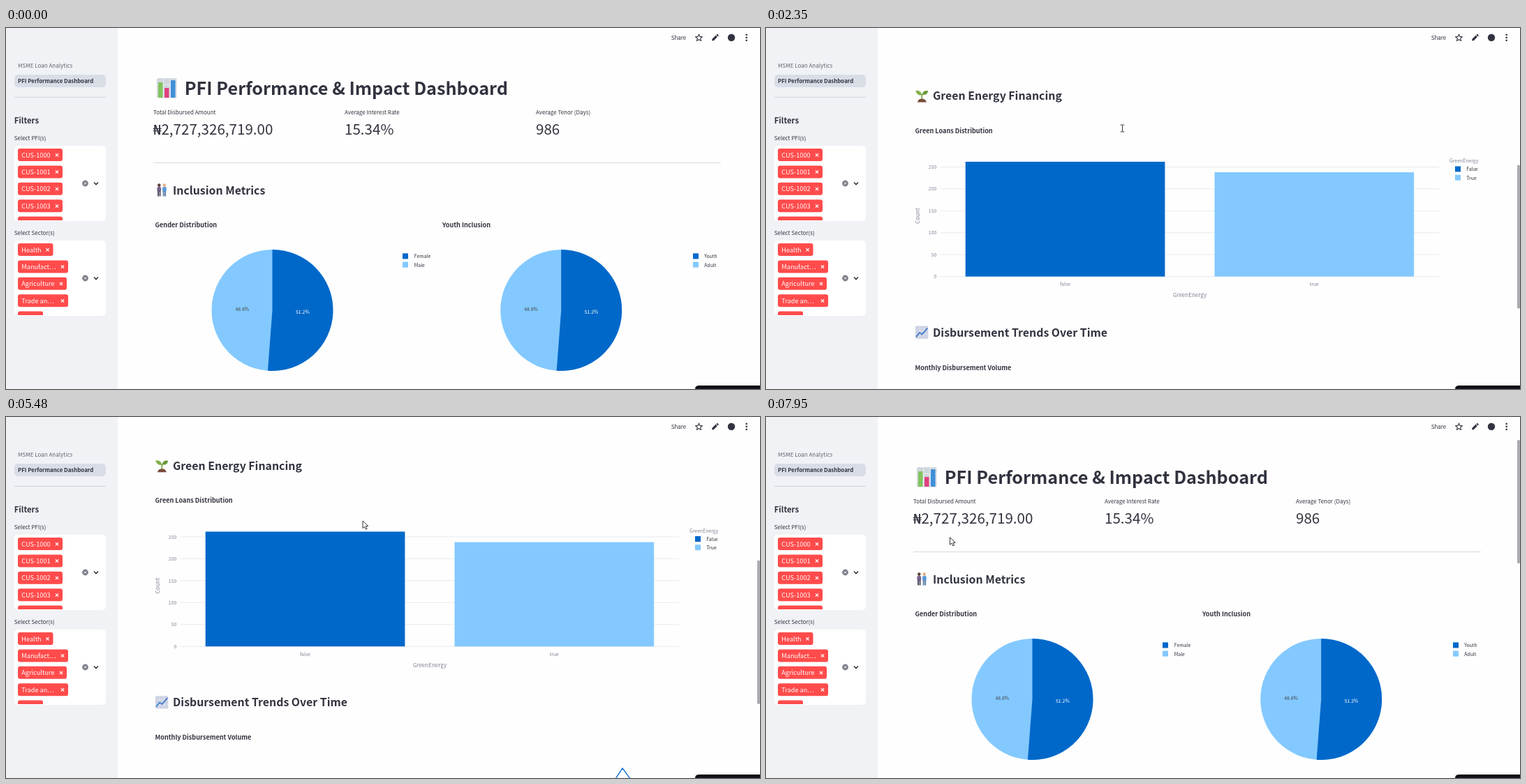
An HTML page that plays this animation: 1080x518 px, repeating every 8000 ms.

```html
<!DOCTYPE html>
<html lang="en">
<head>
<meta charset="utf-8">
<title>Dashboard scroll</title>
<style>
  html, body { margin: 0; width: 100%; height: 100%; overflow: hidden; background: #fefefe; }
  svg { display: block; width: 100%; height: 100%; }
  text { font-family: 'Noto Sans CJK SC', 'Noto Sans CJK JP', 'Noto Sans', sans-serif; white-space: pre; }
</style>
</head>
<body>
<svg id="stage" viewBox="0 0 1080 518" xmlns="http://www.w3.org/2000/svg"></svg>
<script>
const INK = '#31333f', DIM = '#808495', BLUE = '#0068c9', SKY = '#83c9ff', RED = '#ff4b4b', PAPER = '#fefefe';

// ---- drawing helpers (all return SVG markup) ----
const text = (x, y, s, size, o = {}) =>
  `<text x="${x}" y="${y}" font-size="${size}" fill="${o.fill || INK}" font-weight="${o.weight || 400}"` +
  ` text-anchor="${o.anchor || 'start'}"${o.turn ? ` transform="rotate(-90 ${x} ${y})"` : ''}>${s}</text>`;
const rect = (x, y, w, h, fill, r = 0) =>
  `<rect x="${x}" y="${y}" width="${w}" height="${h}" rx="${r}" fill="${fill}"/>`;
const line = (d, stroke, w = 1, extra = '') =>
  `<path d="${d}" fill="none" stroke="${stroke}" stroke-width="${w}" ${extra}/>`;
const shape = (d, fill) => `<path d="${d}" fill="${fill}"/>`;
const dot = (x, y, r, fill) => `<circle cx="${x}" cy="${y}" r="${r}" fill="${fill}"/>`;
const cross = (x, y, r, stroke, w) =>
  line(`M${x - r} ${y - r}l${2 * r} ${2 * r}m0 ${-2 * r}l${-2 * r} ${2 * r}`, stroke, w);
const at = (x, y, inner) => `<g transform="translate(${x} ${y})">${inner}</g>`;
const heading = (y, s) => text(239, y, s, 15.85, { weight: 600 });
const chartTitle = (x, y, s) => text(x, y, s, 9.1, { weight: 700 });
const tick = (x, y, s, anchor) => text(x, y, s, 6.88, { fill: DIM, anchor });
const axisName = (x, y, s, turn) => text(x, y, s, 8.02, { fill: DIM, anchor: 'middle', turn });

function legend(x, y, names, gap) {
  return names.map((n, i) =>
    rect(x, y + i * 12.2, 8, 8, i ? SKY : BLUE) + text(x + gap, y + 7 + i * 12.2, n, 6.88)).join('');
}

// ---- sidebar ----
function picker(y, label, tags) {
  const id = 'box' + y;
  const chips = tags.map(([name, w], i) => {
    const ty = y + 4 + i * 24.4;
    return rect(17, ty, w, 18, RED, 3) + text(22.3, ty + 12.5, name, 9.17, { fill: '#fff' }) +
      cross(w + 9, ty + 9.2, 2.1, '#fff', 1.2);
  }).join('');
  return text(11.7, y - 8, label, 8.02) + rect(12, y, 131, 108, '#fff', 5) +
    `<clipPath id="${id}"><rect x="12" y="${y}" width="131" height="107"/></clipPath>` +
    `<g clip-path="url(#${id})">${chips}</g>` +
    dot(113.5, y + 54, 4.4, '#7d7f89') + cross(113.5, y + 54, 1.5, '#fff', 1) +
    line(`M126 ${y + 52.5}l3 3l3 -3`, INK, 1.6);
}

const sidebar = rect(0, 0, 160, 518, '#f0f2f6') +
  text(17, 57, 'MSME Loan Analytics', 8.02, { fill: '#62646f' }) +
  rect(12, 67, 131, 18, '#d9dde6', 5) +
  text(17, 79, 'PFI Performance Dashboard', 7.88, { weight: 600 }) +
  rect(12, 98.8, 131, 1, '#d0d2d9') +
  text(11.7, 137, 'Filters', 11.4, { weight: 600 }) +
  picker(169, 'Select PFI(s)', [0, 1, 2, 3, 4].map(i => ['CUS-100' + i, 64])) +
  picker(305, 'Select Sector(s)', [['Health', 50.5], ['Manufact…', 72], ['Agriculture', 70], ['Trade an…', 72], ['ICT', 36]]);

// ---- header ----
const star = 'M' + Array.from({ length: 10 }, (_, i) => {
  const a = i * Math.PI / 5, r = i % 2 ? 2.3 : 5.2;
  return `${992.5 + r * Math.sin(a)} ${14.2 - r * Math.cos(a)}`;
}).join('L') + 'Z';

const header = rect(160, 0, 920, 33, PAPER) + text(952.7, 17, 'Share', 8.02) +
  line(star, INK, 1.1, 'stroke-linejoin="round"') +
  shape('M1011.3 18.2v-2.3l5.3-5.3l2.3 2.3l-5.3 5.3zM1017.3 9.9l1-1q.5-.4 1 0l1.3 1.3q.4.5 0 1l-1 1z', INK) +
  dot(1039, 13.8, 5.2, INK) + [9.8, 13.8, 17.8].map(y => dot(1060.7, y, 1.3, INK)).join('');

// ---- small pictures beside the headings ----
const barsIcon = at(216, 72, rect(0, 0, 28.5, 28.5, '#d0d7de', 2) +
  line('M0 9.5h28.5M0 19h28.5M9.5 0v28.5M19 0v28.5', '#e6ebef', 1) +
  rect(2, 6, 6.5, 22, '#83c45c', 1) + rect(11, 14, 6.5, 14, '#e0417f', 1) + rect(20, 3, 6.5, 25, '#3f8fd9', 1));
const person = (x, top, skin, legs) => dot(x, 2.6, 2.3, skin) + rect(x - 2.9, 5, 5.8, 7, top, 2) +
  rect(x - 2.2, 11, 1.9, 7.5, legs) + rect(x + .3, 11, 1.9, 7.5, legs);
const pairIcon = at(214.5, 223, person(4.8, '#77618c', '#5b4038', '#4d4a63') + person(12.4, '#5a9bd8', '#e2b184', '#5d7fa8'));
const sproutIcon = at(214, 562.5,
  shape('M3 18.5q1-5 6.3-5t6.5 5z', '#7a4b3a') + line('M9.4 14.5q-.4-4 .4-7.5', '#6a9a34', 1.5) +
  shape('M9.5 8.3Q2 9 .2 1.8Q8 .4 9.5 8.3z', '#83b04a') + shape('M9.7 7.5Q10.5.8 18.2 2Q17 9.3 9.7 7.5z', '#699c38'));
const trendIcon = at(214, 902, rect(0, 0, 18.3, 18.3, '#cdd2e4', 1.5) +
  line('M0 6h18.3M0 12h18.3M6 0v18.3M12 0v18.3', '#e3e6f1', .7) +
  line('M1 15.5L6 9.5L9.5 12L17.3 3', '#3b78c6', 1.7));

// ---- page content, placed as at scroll position 0 ----
function pie(cx, title, tx, names, lx, gap) {
  const r = 87, cy = 405, a = .512 * 2 * Math.PI;
  return chartTitle(tx, 286, title) + dot(cx, cy, r, SKY) +
    shape(`M${cx} ${cy}V${cy - r}A${r} ${r} 0 1 1 ${cx + r * Math.sin(a)} ${cy - r * Math.cos(a)}Z`, BLUE) +
    text(cx + 43.4, 409.7, '51.2%', 6.88, { fill: '#fff', anchor: 'middle' }) +
    text(cx - 43.2, 405.7, '48.8%', 6.88, { fill: '#444', anchor: 'middle' }) +
    legend(lx, 323.4, names, gap);
}

function bars() {
  let s = chartTitle(213.5, 625, 'Green Loans Distribution');
  for (let i = 0; i < 6; i++) {
    const y = 831 - i * 31.45;
    s += rect(250, y - .5, 714, 1, '#e8eaf0') + tick(244.3, y + 2.7, i * 50, 'end');
  }
  return s + rect(285.7, 666.3, 285.7, 164.7, BLUE) + rect(642.5, 681.4, 285.6, 149.6, SKY) +
    tick(428.5, 844.7, 'false', 'middle') + tick(785.3, 844.7, 'true', 'middle') +
    axisName(607, 860.6, 'GreenEnergy') + axisName(220, 744, 'Count', true) +
    text(979, 667.6, 'GreenEnergy', 6.88, { fill: DIM }) + legend(987, 672.8, ['False', 'True'], 16.3);
}

const MONTH_X = [255.5, 326.5, 391, 462.5, 531.3, 602.5, 671.5, 743, 814, 883, 954.3, 1023.5];
const MONTH_Y = [278.6, 332.3, 264.2, 275.4, 225, 238.8, 327.8, 275.7, 282.3, 176.6, 275.4, 273.4];

function trend() {
  let s = chartTitle(213.5, 965, 'Monthly Disbursement Volume');
  for (let i = 0; i < 5; i++) {
    const y = 1144.4 - i * 30.15;
    s += rect(255.5, y - .5, 768, 1, '#e8eaf0') + tick(249.3, y + 2.7, 150 + i * 50 + 'M', 'end');
  }
  ['Jan', 'Mar', 'May', 'Jul', 'Sep', 'Nov'].forEach((m, i) => s += tick(MONTH_X[2 * i], 1183.8, m + ' 2023', 'middle'));
  const pts = MONTH_X.map((x, i) => `${x} ${MONTH_Y[i] + 829}`).join('L');
  return s + line('M' + pts, BLUE, 1.3, 'stroke-linejoin="round"') +
    axisName(639, 1200, 'Month') + axisName(220, 1083.5, 'AmountGranted', true);
}

const GREY = '#c3c4c9';
const toolbar = '<g id="tools">' + at(0, 944,
  rect(886, -3.2, 10, 7.6, GREY, 1) + rect(889, -4.6, 4, 2, GREY) + dot(891, .6, 2.2, PAPER) + dot(891, .6, 1.1, GREY) +
  `<circle cx="910.5" cy="-.8" r="3.2" fill="none" stroke="#70727b" stroke-width="1.5"/>` +
  line('M912.8 1.6l3 3', '#70727b', 1.9) + line('M909 -.8h3m-1.5 -1.5v3', '#70727b', .9) +
  line('M922 0h10M927 -5v10', GREY, 1.2) +
  line('M923.8 -1.8l-1.8 1.8l1.8 1.8M930.2 -1.8l1.8 1.8l-1.8 1.8M925.2 -3.2l1.8 -1.8l1.8 1.8M925.2 3.2l1.8 1.8l1.8 -1.8', GREY, 1) +
  rect(943, -4.5, 9, 9, GREY, 1) + line('M944.6 0h5.8m-2.9 -2.9v5.8', PAPER, 1.3) +
  rect(958.5, -4.5, 9, 9, GREY, 1) + line('M960.1 0h5.8', PAPER, 1.3) +
  cross(978.5, 0, 3.4, GREY, 1.2) +
  line('M974 -2v-2.5h2.5M980.5 -4.5h2.5v2.5M983 2v2.5h-2.5M976.5 4.5h-2.5v-2.5', GREY, 1.2) +
  shape('M988.8 .3l5.2-4.8l5.2 4.8h-1.4v4h-2.5v-3h-2.6v3h-2.5v-4z', GREY) +
  line('M1009.5 -1.2v-2.3h2.4M1014.1 -3.5h2.4v2.3M1016.5 1.2v2.3h-2.4M1011.9 3.5h-2.4v-2.3', GREY, 1.2)) + '</g>';

const FAINT = { fill: '#83848c' };
const footer = rect(211, 1252.3, 813, 1, '#d8d9dd') +
  text(211, 1283.2, 'Built with', 8.02, FAINT) +
  shape('M254.9 1285l-4-4.2q-1.2-2.4.6-3.8q2-1 3.4.9q1.4-1.9 3.4-.9q1.8 1.4.6 3.8z', '#e59a8c') +
  text(262.8, 1283.2, 'for KVQ and regulators by Femolade Akundareze', 8.02, FAINT);

const metric = (x, label, value, vx = x) => text(x, 124, label, 8.02) + text(vx, 153, value, 20.6);
const page = barsIcon + text(255.8, 96, 'PFI Performance &amp; Impact Dashboard', 25.2, { weight: 700 }) +
  metric(211, 'Total Disbursed Amount', '2,727,326,719.00', 222.4) +
  `<text x="210.8" y="153" font-size="19.5" fill="${INK}" style="font-family:'DejaVu Sans Mono',monospace">₦</text>` +
  metric(485, 'Average Interest Rate', '15.34%') + metric(759, 'Average Tenor (Days)', '986') +
  rect(211, 193, 813, 1, '#d8d9dd') +
  pairIcon + heading(239, 'Inclusion Metrics') +
  pie(381.5, 'Gender Distribution', 213.5, ['Female', 'Male'], 568, 16.7) +
  pie(795.2, 'Youth Inclusion', 625, ['Youth', 'Adult'], 984, 16.2) +
  sproutIcon + heading(577.7, 'Green Energy Financing') + bars() +
  trendIcon + heading(917.2, 'Disbursement Trends Over Time') + trend() + toolbar + footer;

// ---- pointers, hot spot at 0,0 ----
const pointers = {
  arrow: `<path d="M0 0v10.6l2.5-2.3l1.7 3.9l1.9-.8l-1.7-3.8h3.4z" fill="#fff" stroke="#222" stroke-width=".9"/>`,
  beam: line('M-2.8 -5h2q.8 0 .8 .8v8.4q0 .8 -.8 .8h-2M2.8 -5h-2q-.8 0 -.8 .8v8.4q0 .8 .8 .8h2', '#333', 1),
  plus: line('M-7.5 0h15M0 -7.5v15', '#111', 1.6)
};

const stage = document.getElementById('stage');
stage.innerHTML = rect(0, 0, 1080, 518, PAPER) + `<g id="page">${page}</g>` + header + sidebar +
  '<rect id="thumb" x="1076" width="4" rx="1.5" fill="#acacb0"/>' +
  shape('M987 518q0-5 6-5h87v5z', '#0e1117') +
  Object.entries(pointers).map(([k, v]) => `<g id="${k}">${v}</g>`).join('');
const el = id => document.getElementById(id);

// ---- motion ----
// Wheel turns: start, duration, distance
const NOTCH = 179.15;
const TURNS = [
  [1375, 268, NOTCH], [1588, 481, NOTCH], [2242, 268, NOTCH], [2640, 310, NOTCH], [3100, 250, 112.5],
  [5040, 270, -NOTCH], [5300, 310, -NOTCH], [5871, 399, -2 * NOTCH], [6420, 310, -112.5]
];
// Scroll position, thumb top, thumb bottom
const THUMB = [[0, 33, 210], [231, 79, 285], [247, 99, 305], [473, 196, 402], [717, 278, 485], [829, 311, 518]];
// Time, x, y
const PATH = [
  [300, 800, 520], [430, 640, 320], [620, 510.5, 144], [2650, 510.5, 144], [2700, 508.7, 143.6],
  [3350, 508.7, 143.6], [3500, 510.5, 148], [5040, 510.5, 148], [5100, 511, 149], [7440, 511, 149],
  [7540, 762, 300], [7640, 640, 450], [7750, 340, 430], [7850, 206, 260], [7940, 263.5, 172.7]
];

const clamp = p => Math.min(1, Math.max(0, p));
function lerpKeys(keys, v) {
  const last = keys.length - 1;
  let i = 0;
  while (i < last - 1 && v > keys[i + 1][0]) i++;
  const p = clamp((v - keys[i][0]) / (keys[i + 1][0] - keys[i][0]));
  return keys[i].slice(1).map((a, k) => a + (keys[i + 1][k + 1] - a) * p);
}
const scrollAt = t => TURNS.reduce((s, [start, dur, dist]) =>
  s + dist * (1 - (1 - clamp((t - start) / dur)) ** 2), 0);
const pointerAt = t => t < 300 ? '' : t < 570 ? 'arrow' : t < 2690 ? 'beam' : t < 3500 ? 'arrow' : t < 5100 ? 'plus' : 'arrow';

function draw() {
  const t = performance.now() % 8000;
  const y = scrollAt(t);
  el('page').setAttribute('transform', `translate(0 ${-y})`);
  const [top, bottom] = lerpKeys(THUMB, y);
  el('thumb').setAttribute('y', top);
  el('thumb').setAttribute('height', bottom - top);
  el('thumb').setAttribute('opacity', t < 290 ? 0 : 1);
  el('tools').setAttribute('opacity', clamp((t - 3200) / 150) * clamp((5300 - t) / 200));
  const [px, py] = lerpKeys(PATH, t), shown = pointerAt(t);
  for (const k in pointers) {
    el(k).setAttribute('transform', `translate(${px} ${py})`);
    el(k).setAttribute('visibility', k === shown ? 'visible' : 'hidden');
  }
  requestAnimationFrame(draw);
}
draw();
</script>
</body>
</html>
```
